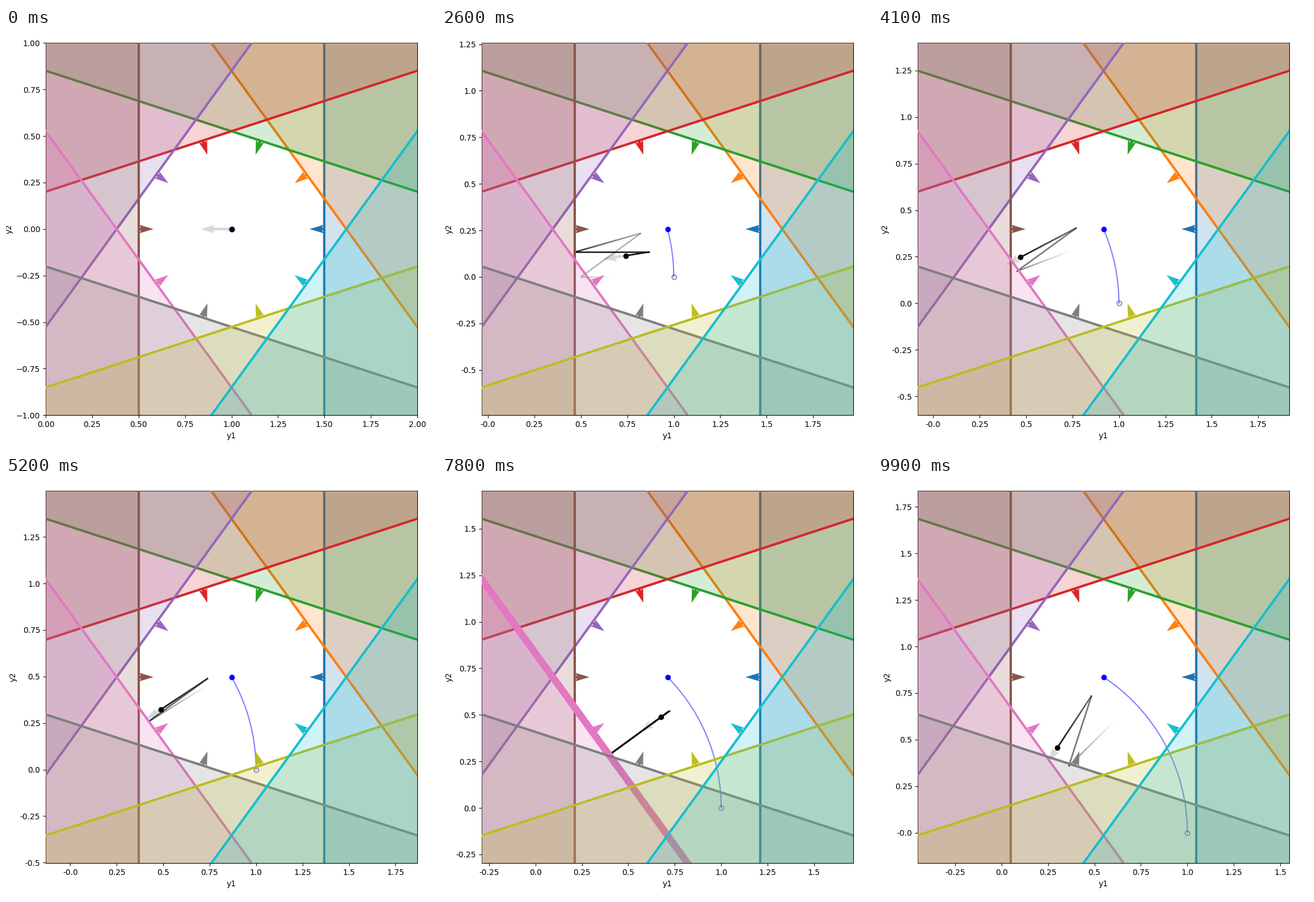
A matplotlib script that plays this animation: 758 by 739 pixels, repeating every 10000 ms.

```python
import numpy as np
import matplotlib.pyplot as plt
from matplotlib.animation import FuncAnimation
from matplotlib.collections import LineCollection
from matplotlib.patches import Polygon

W, H, DPI = 758, 739, 100
FRAMES, STEPS = 100, 100     # animation frames, simulation steps per frame
DT = 0.1 / STEPS
RADIUS, JUMP = 0.5, 0.4      # inradius of the decagon, reset distance
TRAIL = 10 * STEPS           # trail length in steps

angles = np.arange(10) * np.pi / 5
normals = np.column_stack([np.cos(angles), np.sin(angles)])


def center(t):
    return np.array([np.cos(0.1 * t), np.sin(0.1 * t)])


def simulate():
    """Decay to the origin, with a jump along the inward normal at each face."""
    x = np.array([1.0, 0.0])
    path, hits = [(0, *x)], []
    for k in range(1, FRAMES * STEPS + 1):
        x = x * np.exp(-DT)
        dist = normals @ (x - center(k * DT))
        face = int(dist.argmax())
        if dist[face] >= RADIUS:
            path.append((k, *x))
            x = x - JUMP * normals[face]
            path.append((k, *x))
            hits.append((k, face))
        elif k % 20 == 0:
            path.append((k, *x))
    return np.array(path), hits


path, hits = simulate()

fig = plt.figure(figsize=(W / DPI, H / DPI), dpi=DPI)
ax = fig.add_axes([70 / W, 57.7 / H, 655 / W, 655 / H])
ax.set(xlim=(-1, 1), ylim=(-1, 1), xlabel="y1", ylabel="y2")
for spine in ax.spines.values():
    spine.set_zorder(0.5)

# Everything is drawn relative to the moving center.
arrow = ax.quiver([0], [0], [-1], [0], color="k", alpha=0.15,
                  scale_units="width", scale=2, zorder=1)
arc, = ax.plot([], [], color="b", alpha=0.5, lw=1.5, zorder=1.1)
trail = ax.add_collection(LineCollection([], linewidths=2, zorder=1.2),
                          autolim=False)
ax.plot([0], [0], "o", color="b", zorder=1.3)
ball, = ax.plot([], [], "o", color="k", zorder=1.4)
start, = ax.plot([], [], "o", mfc="none", mec="navy", alpha=0.6, zorder=1.5)

faces = []
for i, n in enumerate(normals):
    color, z = f"C{i}", 2 + 0.1 * i
    tangent = np.array([-n[1], n[0]])
    p = RADIUS * n
    a, b = p - 3 * tangent, p + 3 * tangent
    ax.add_patch(Polygon([a, b, b + 3 * n, a + 3 * n], fc=color, ec="none",
                         lw=0, alpha=0.2, zorder=z))
    ax.quiver(*p, *(-0.08 * n), color=color, scale_units="width", scale=2,
              zorder=z + 0.02)
    line, = ax.plot(*np.transpose([a, b]), color=color, lw=3, zorder=z + 0.05)
    faces.append(line)
ax.set(xlim=(-1, 1), ylim=(-1, 1))


def set_ticks(axis, c, frame):
    first = np.ceil((c - 1) / 0.25) * 0.25
    values = np.arange(first, c + 1 + 1e-9, 0.25)
    if frame == 0:
        labels = [f"{v:.2f}".replace("-", "\u2212") for v in values]
    else:
        labels = [str(float(v)) for v in values]
    axis.set_ticks(values - c, labels)


def update(frame):
    now = frame * STEPS
    c = center(now * DT)
    set_ticks(ax.xaxis, c[0], frame)
    set_ticks(ax.yaxis, c[1], frame)

    recent = path[(path[:, 0] >= now - TRAIL) & (path[:, 0] <= now)]
    pts = recent[:, 1:] - c
    trail.set_segments(np.stack([pts[:-1], pts[1:]], axis=1))
    age = (now - (recent[:-1, 0] + recent[1:, 0]) / 2) / TRAIL
    rgba = np.zeros((len(age), 4))
    rgba[:, 3] = 1 - age
    trail.set_color(rgba)

    pos = pts[-1]
    ball.set_data([pos[0]], [pos[1]])
    arrow.set_offsets([pos])
    u, v = -recent[-1, 1:] / 6
    arrow.set_UVC([u], [v])

    th = np.linspace(0, 0.1 * now * DT, 60)
    arc.set_data(np.cos(th) - c[0], np.sin(th) - c[1])
    start.set_data([1 - c[0]], [-c[1]])

    struck = {f for k, f in hits if now - STEPS < k <= now}
    for i, line in enumerate(faces):
        line.set_linewidth(9 if i in struck else 3)
    return []


anim = FuncAnimation(fig, update, frames=FRAMES, init_func=lambda: [],
                     interval=100, repeat=True, repeat_delay=0, blit=False)
plt.show()
```
